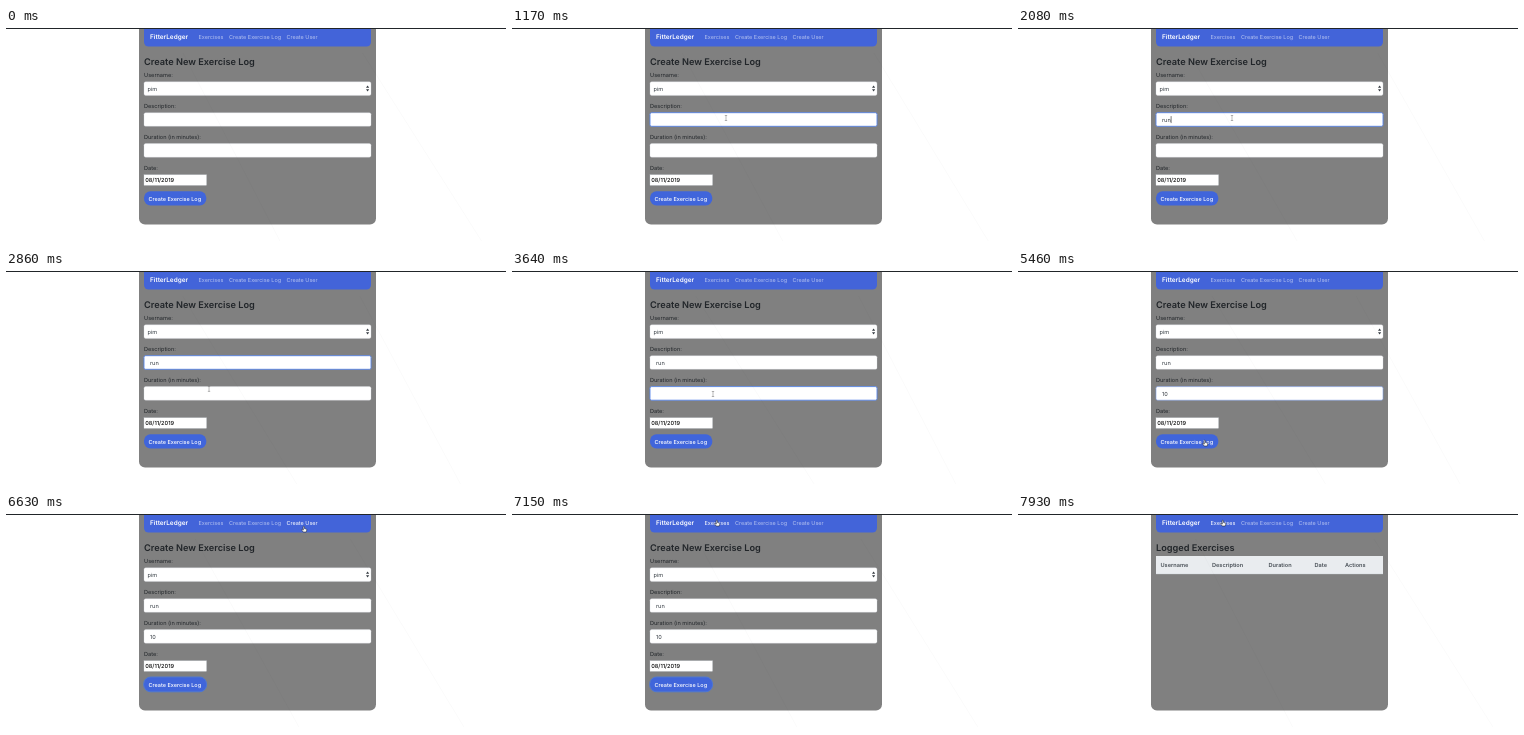
Animation of 500x215 px, one loop 8000 ms. Source, as an HTML page:

```html
<!DOCTYPE html>
<html lang="en">
<head>
<meta charset="utf-8">
<title>Exercise log form</title>
<style>
  html, body { margin: 0; width: 100%; height: 100%; overflow: hidden; background: #fff; }
  svg { display: block; width: 500px; height: 215px; fill: #212529; text-rendering: geometricPrecision;
    font: 5.6px Inter, "Liberation Sans", sans-serif; }
  .brand { font-size: 6.4px; font-weight: 600; fill: #fff; }
  .link { font-size: 5.5px; fill: #fff; fill-opacity: .6; }
  .link.hover { fill-opacity: 1; }
  .title { font-size: 9.2px; font-weight: 600; }
  .field { fill: #fff; stroke: #ced4da; stroke-width: .3; }
  .value { fill: #333a41; }
  .date { font-weight: 500; fill: #000; }
  .button { fill: #4065db; }
  .action { font-size: 5.5px; font-weight: 500; fill: #fff; }
  .ring { fill: none; stroke: #3d74ee; stroke-width: .9; }
  .th { font-weight: 600; fill: #495057; }
  .web { stroke: #000; stroke-opacity: .04; stroke-width: .6; }
  .cursor { stroke-width: .5; stroke-linejoin: round; stroke-linecap: round; }
</style>
</head>
<body>
<svg viewBox="0 0 500 215">
  <path d="M133 0H370V190.500a6 6 0 0 1-6 6H139a6 6 0 0 1-6-6Z" fill="#808080"/>
  <path d="M138 0H365V14a4.500 4.500 0 0 1-4.500 4.500H142.500a4.500 4.500 0 0 1-4.500-4.500Z" fill="#4364d9"/>
  <g id="nav"></g>
  <g id="form"></g>
  <g id="list"></g>
  <path id="web" class="web"/>
  <path id="cursor" class="cursor"/>
  <rect width="500" height="1"/>
</svg>
<script>
const LOOP = 8000, STEP = 130, LIST_AT = 7800, ROW = 30.9;
const $ = id => document.getElementById(id);
const text = (cls, x, y, s) => `<text class="${cls}" x="${x}" y="${y}">${s}</text>`;
const box = (cls, x, y, w, h, r) =>
  `<rect class="${cls}" x="${x}" y="${y}" width="${w}" height="${h}" rx="${r}"/>`;

$('nav').innerHTML = text('brand', 144, 11, 'FitterLedger') +
  text('link', 192.5, 11, 'Exercises') +
  text('link', 223, 11, 'Create Exercise Log') +
  text('link', 280.5, 11, 'Create User');

const rows = ['Username:', 'Description:', 'Duration (in minutes):', 'Date:'];
$('form').innerHTML = text('title', 138, 37.2, 'Create New Exercise Log') +
  rows.map((label, i) => {
    const y = 48.8 + i * ROW, date = i === 3;
    return text('label', 138, y, label) +
      (date ? box('field', 138, y + 5.3, 62.5, 10.5, 0) : box('field', 138, y + 5, 227, 13.6, 1.6)) +
      text(date ? 'date' : 'value', [141.5, 144, 144, 139.2][i], y + (date ? 12.8 : 14), ['pim', '', '', '08/11/2019'][i]);
  }).join('') +
  '<path d="M360 59.800l1.600-2.200 1.600 2.200zM360 61.200l1.600 2.200 1.600-2.200z" fill="#343a40"/>' +
  box('button', 138, 163.3, 62.3, 14.2, 6.5) +
  text('action', 142.5, 172.6, 'Create Exercise Log') +
  '<path id="caret" stroke="#222" stroke-width=".6"/>' +
  [1, 2].map(i => box('ring', 138, 53.8 + i * ROW, 227, 13.6, 1.6)).join('') +
  box('ring', 137.7, 163, 62.9, 14.8, 6.8);

$('list').innerHTML = text('title', 138, 37.2, 'Logged Exercises') +
  '<path d="M138 42h227v18h-227z" fill="#e9ecef"/><path d="M138 59.700h227" stroke="#dee2e6" stroke-width=".7"/>' +
  text('th', 142.5, 53, 'Username') + text('th', 194, 53, 'Description') +
  text('th', 250.5, 53, 'Duration') + text('th', 296.5, 53, 'Date') + text('th', 327, 53, 'Actions');

const all = q => [...document.querySelectorAll(q)];
const links = all('.link'), fields = all('.field'), values = all('.value'), rings = all('.ring');
const button = document.querySelector('.button');

const glides = [
  { from: 130, to: 520, x: 214, y: 90 },
  { from: 2470, to: 2990, x: 201, y: 123 },
  { from: 4810, to: 5460, x: 187, y: 172 },
  { from: 6240, to: 6630, x: 298, y: 15 },
  { from: 6630, to: 7150, x: 205, y: 9 }
];

// Focus order: description, duration, button
const stops = [
  { from: 650, to: 3120, word: 'run', keys: [1950, 2080, 2080] },
  { from: 3120, to: 5300, word: '10', keys: [4160, 4300] },
  { from: 5460, to: LOOP }
];

const shapes = {
  arrow: { d: 'M0 0V6L1.4 4.700 2.400 7 3.400 6.600 2.400 4.400H4.300Z', fill: '#000', stroke: '#fff' },
  beam: { d: 'M-.8-2.500H.8M0-2.500V2.500M-.8 2.500H.8', fill: 'none', stroke: '#777' },
  hand: { d: 'M-.8-2.500Q-.1-3.200 .4-2.400V-.4L2.300 0Q2.900.3 2.700 1.200L2.200 3H-.8L-2.300.9Q-2.300 0-1.500.2L-.8.9Z', fill: '#fff', stroke: '#111' }
};

const clamp = v => Math.max(0, Math.min(1, v));
const smooth = v => v * v * (3 - 2 * v);
const set = (node, attrs) => { for (const k in attrs) node.setAttribute(k, attrs[k]); };

function pointer(t) {
  const now = Math.floor(t / STEP) * STEP;
  return glides.reduce((p, g) => {
    const k = smooth(clamp((now - g.from) / (g.to - g.from)));
    return { x: p.x + (g.x - p.x) * k, y: p.y + (g.y - p.y) * k };
  }, { x: 233, y: 28 });
}

function hits(node, { x, y }) {
  const b = node.getBBox(), pad = 3;
  return b.width > 0 && x >= b.x && x <= b.x + b.width && y >= b.y - pad && y <= b.y + b.height + pad;
}

function drawFocus(t) {
  let caret = '';
  stops.forEach((s, i) => {
    rings[i].style.opacity = .8 * clamp((t - s.from) / 150) * clamp(1 - (t - s.to) / 300);
    if (!s.word) return;
    const typed = s.keys.filter(k => k <= t), value = values[i + 1];
    value.textContent = s.word.slice(0, typed.length);
    const idle = t - (typed.pop() || s.from);
    if (t >= s.from && t < s.to && idle % 1040 < 520) {
      const x = 144.4 + (value.textContent ? value.getComputedTextLength() : 0);
      caret = `M${x} ${57.2 + (i + 1) * ROW}v7`;
    }
  });
  set($('caret'), { d: caret });
}

function drawPointer(t) {
  const p = pointer(t);
  links.forEach(l => l.classList.toggle('hover', hits(l, p)));
  const kind = [...links, button].some(n => hits(n, p)) ? 'hand' :
    fields.some(n => hits(n, p)) ? 'beam' : 'arrow';
  set($('cursor'), { ...shapes[kind], transform: `translate(${p.x} ${p.y})` });
  $('cursor').style.display = t < 260 ? 'none' : '';
}

// Faint strands drifting behind the page
function drawWeb(t) {
  const sway = n => Math.cos((t / LOOP) * 2 * Math.PI + n);
  const strand = (x, n) => `M${x + 12 * sway(n)} 25L${x + 108 + 20 * sway(n + .5)} 213`;
  set($('web'), { d: strand(182, 2) + strand(350, -1) });
}

function draw(t) {
  const listed = t >= LIST_AT;
  $('form').style.display = listed ? 'none' : '';
  $('list').style.display = listed ? '' : 'none';
  drawFocus(t);
  drawPointer(t);
  drawWeb(t);
}

function tick() {
  draw(performance.now() % LOOP);
  requestAnimationFrame(tick);
}
tick();
</script>
</body>
</html>
```
